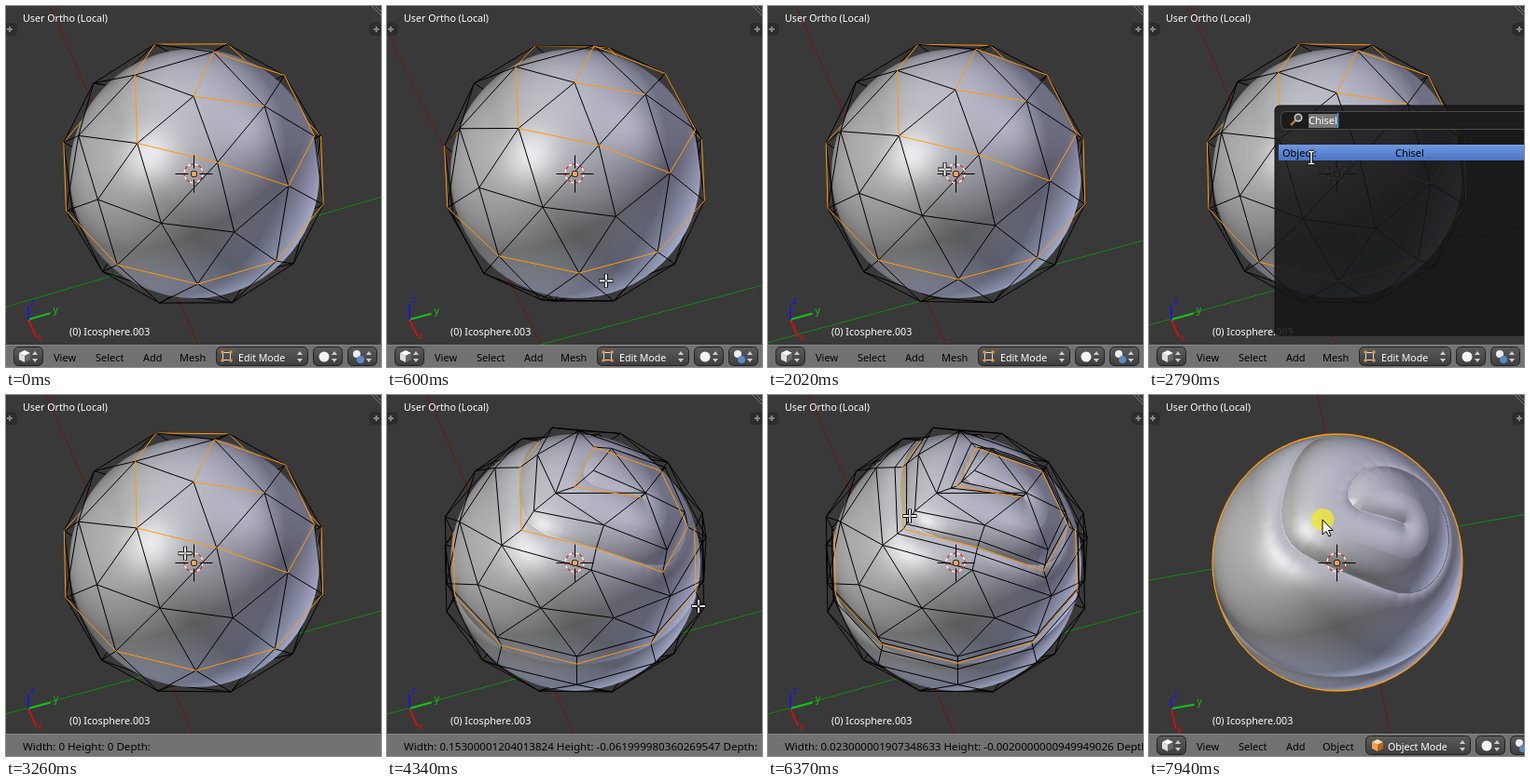
An HTML page with a canvas that plays this animation: 402x388 px, repeating every 8000 ms.

```html
<!DOCTYPE html>
<html>
<head>
<meta charset="utf-8">
<style>
html, body { margin: 0; width: 100%; height: 100%; overflow: hidden; background: #393939; }
canvas { display: block; }
</style>
</head>
<body>
<canvas id="stage" width="402" height="388"></canvas>
<script>
const ctx = document.getElementById('stage').getContext('2d');
const LOOP = 8000, FIRST = 130, STEP = 155.4;
const CX = 201, CY = 180, SCALE = 145, ORANGE = '#ff9a0a';
const CUT_WIDTH = .175, CUT_DEPTH = .062;

const clamp = (v, lo, hi) => Math.min(hi, Math.max(lo, v));
const ramp = (t, a, b) => clamp((t - a) / (b - a), 0, 1);
const mix = (p, q, k) => p.map((v, i) => v + (q[i] - v) * k);
const add = (p, q, k = 1) => p.map((v, i) => v + q[i] * k);
const scale = (p, k) => p.map(v => v * k);
const dot = (p, q) => p[0] * q[0] + p[1] * q[1] + p[2] * q[2];
const unit = p => scale(p, 1 / Math.hypot(...p));
const cross = (p, q) => [p[1] * q[2] - p[2] * q[1], p[2] * q[0] - p[0] * q[2], p[0] * q[1] - p[1] * q[0]];
const distance = (p, q) => Math.hypot(...add(p, q, -1));

// keys: [time, ...values]
function track(t, keys) {
  const i = Math.max(0, keys.findLastIndex(k => k[0] <= t));
  const a = keys[i], b = keys[i + 1] || a;
  return mix(a, b, a === b ? 0 : ramp(t, a[0], b[0])).slice(1);
}
// azimuth and elevation in degrees
const viewKeys = [[0, 19.7, 55.1], [1060, 20.2, 41.8], [2150, 19, 53.3], [6960, 19, 53.3], [7890, 11, 64.3]];
const pointerKeys = [[0, 232, 400], [1060, 237, 214], [2300, 174, 163], [3100, 174, 163], [4320, 334, 227],
  [4600, 334, 227], [4930, 128, 128], [5720, 128, 128], [6340, 152, 130], [6800, 152, 130], [7890, 186, 134]];

// Icosphere with one subdivision
const ring = (n, phase, z) => Array.from({ length: n }, (_, k) => {
  const a = (phase + 360 / n * k) * Math.PI / 180, r = Math.sqrt(1 - z * z);
  return [r * Math.cos(a), r * Math.sin(a), z];
});
const cap = [[0, 0, 1], ...ring(5, 0, .851), ...ring(5, 0, .447), ...ring(5, 36, .526)];
const verts = [...cap, ...ring(10, 18, 0), ...cap.map(v => scale(v, -1))];
const edges = verts.flatMap((p, i) => verts.flatMap((q, j) => i < j && distance(p, q) < .7 ? [[i, j]] : []));

const spiral = [19, 8, 13, 4, 5, 1, 11, 7, 12, 3, 0, 2];
const equator = Array.from({ length: 11 }, (_, i) => 16 + i % 10);
const marked = new Set();
const sideways = {};
for (const path of [spiral, equator]) path.forEach((v, i) => {
  if (i) marked.add([path[i - 1], v].sort((a, b) => a - b).join());
  const closed = path === equator;
  const prev = path[i - 1] ?? (closed && path[9]), next = path[i + 1] ?? (closed && path[1]);
  sideways[v] = prev && next !== false
    ? unit(cross(verts[v], add(verts[next], verts[prev], -1))) : [0, 0, 0];
});

function makeView([azimuth, elevation]) {
  const a = azimuth * Math.PI / 180, e = elevation * Math.PI / 180;
  const right = [Math.sin(a), Math.cos(a), 0];
  const down = [Math.cos(a) * Math.sin(e), -Math.sin(a) * Math.sin(e), -Math.cos(e)];
  const near = [Math.cos(a) * Math.cos(e), -Math.sin(a) * Math.cos(e), Math.sin(e)];
  const eye = v => [dot(v, right), dot(v, down), dot(v, near)];
  return { eye, at: (v, k = SCALE, x = CX, y = CY) => [x + k * dot(v, right), y + k * dot(v, down)] };
}

function line(p, q, color, width = 1) {
  ctx.strokeStyle = color;
  ctx.lineWidth = width;
  ctx.beginPath();
  ctx.moveTo(...p);
  ctx.lineTo(...q);
  ctx.stroke();
}
function text(str, x, y, color = '#000', size = 11) {
  ctx.font = size + 'px "Noto Sans", "Open Sans", sans-serif';
  ctx.fillStyle = color;
  ctx.fillText(str, x, y);
}
function disc(x, y, r, color) {
  ctx.fillStyle = color;
  ctx.beginPath();
  ctx.arc(x, y, r, 0, 7);
  ctx.fill();
}
function box(x, y, w, h, r, fill, border) {
  ctx.beginPath();
  ctx.roundRect(x, y, w, h, r);
  ctx.fillStyle = fill;
  ctx.fill();
  if (border) { ctx.strokeStyle = border; ctx.lineWidth = 1; ctx.stroke(); }
}
function poly(points, fill) {
  ctx.fillStyle = fill;
  ctx.beginPath();
  points.forEach(p => ctx.lineTo(...p));
  ctx.closePath();
  ctx.fill();
}
function vertical(y, h, top, bottom) {
  const g = ctx.createLinearGradient(0, y, 0, y + h);
  g.addColorStop(0, top);
  g.addColorStop(1, bottom);
  return g;
}
const cross4 = [[1, 0], [-1, 0], [0, 1], [0, -1]];
function drawCross(x, y, from, to, color, width) {
  for (const [dx, dy] of cross4)
    line([x + dx * from, y + dy * from], [x + dx * to, y + dy * to], color, width);
}

function drawAxes(view) {
  const origin = scale([-311, 75, -621], 1 / SCALE);
  const axis = (dir, color) => line(view.at(add(origin, dir, -9)), view.at(add(origin, dir, 9)), color);
  axis([1, 0, 0], '#7a1010');
  axis([0, 1, 0], '#128a12');
}

// Rounded path on the unit sphere
function roundedPath(path) {
  const p = path.map(v => verts[v]), out = [p[0]];
  for (let i = 1; i < p.length - 1; i++) {
    const a = i > 1 ? mix(p[i - 1], p[i], .5) : p[0], b = mix(p[i], p[i + 1], .5);
    for (let k = 1; k <= 5; k++) out.push(unit(mix(mix(a, p[i], k / 5), mix(p[i], b, k / 5), k / 5)));
  }
  return [...out, p.at(-1)];
}
const grooves = [spiral.slice(2), [23, 24, 25, 16, 17, 18]].map(roundedPath);

// Directions in eye space (y down), diffuse colour and highlight strength
const lights = [
  { dir: unit([-.892, -.3, .9]), color: [.8, .8, .8], shine: .5 },
  { dir: unit([.588, -.46, .248]), color: [.498, .5, .6], shine: .2 },
  { dir: unit([.216, .392, -.216]), color: [.798, .838, 1], shine: 0 }
];
for (const l of lights) l.half = unit(add(l.dir, [0, 0, 1]));

function shade(n) {
  const rgb = [.04, .04, .04];
  for (const { dir, half, color, shine } of lights) {
    const diffuse = .8 * Math.max(0, dot(n, dir));
    const gloss = diffuse ? .5 * shine * Math.max(0, dot(n, half)) ** 35 : 0;
    for (let i = 0; i < 3; i++) rgb[i] += color[i] * diffuse + gloss;
  }
  return rgb;
}

const SIZE = 288, HALF = SIZE / 2;
const ball = Object.assign(document.createElement('canvas'), { width: SIZE, height: SIZE });

function sphereNormal(x, y, radius) {
  let nx = (x - HALF) / radius, ny = (y - HALF) / radius;
  const r = Math.hypot(nx, ny);
  if (r > .999) { nx *= .999 / r; ny *= .999 / r; }
  return [nx, ny, Math.sqrt(1 - nx * nx - ny * ny)];
}

function grooveHeights(view, depth, radius) {
  const segments = [];
  for (const groove of grooves) {
    const p = groove.map(view.eye);
    p.slice(1).forEach((b, i) => {
      const d = add(b, p[i], -1);
      if (b[2] > -.4) segments.push([...p[i], ...d, dot(d, d)]);
    });
  }
  return Float32Array.from({ length: SIZE * SIZE }, (_, i) => {
    const [x, y, z] = sphereNormal(i % SIZE, Math.floor(i / SIZE), radius);
    let best = 9;
    for (const [ax, ay, az, dx, dy, dz, len] of segments) {
      const px = x - ax, py = y - ay, pz = z - az;
      let k = (px * dx + py * dy + pz * dz) / len;
      k = k < 0 ? 0 : k > 1 ? 1 : k;
      const ex = px - k * dx, ey = py - k * dy, ez = pz - k * dz;
      best = Math.min(best, ex * ex + ey * ey + ez * ez);
    }
    return -depth * Math.exp(-Math.sqrt(best) / .11);
  });
}

function paintBall(view, depth, radius) {
  const brush = ball.getContext('2d'), image = brush.createImageData(SIZE, SIZE);
  const h = depth ? grooveHeights(view, depth, radius) : new Float32Array(SIZE * SIZE);
  for (let y = 1; y < SIZE - 1; y++) for (let x = 1; x < SIZE - 1; x++) {
    const i = y * SIZE + x;
    let n = sphereNormal(x, y, radius);
    if (depth) {
      const slope = [(h[i + 1] - h[i - 1]) * radius / 2, (h[i + SIZE] - h[i - SIZE]) * radius / 2, 0];
      n = unit(add(n, add(slope, n, -dot(slope, n)), -1));
    }
    const rgb = shade(n);
    for (let c = 0; c < 3; c++) image.data[i * 4 + c] = 255 * rgb[c];
    image.data[i * 4 + 3] = 255;
  }
  brush.putImageData(image, 0, 0);
}

function drawBody(view, cut, bevel, smooth) {
  const radius = 134 + 2 * cut;
  paintBall(view, smooth ? .07 : .03 * cut + .025 * bevel, radius);
  ctx.save();
  ctx.beginPath();
  ctx.ellipse(CX + 1, CY, radius - 2 * cut, radius + 2 * cut, 0, 0, 7);
  ctx.save();
  ctx.clip();
  ctx.drawImage(ball, CX + 1 - HALF, CY - HALF);
  ctx.restore();
  if (smooth) { ctx.strokeStyle = ORANGE; ctx.lineWidth = 1.3; ctx.stroke(); }
  ctx.restore();
}

function buildWire(view, cut, bevel) {
  const wire = { front: [], back: [] };
  const points = verts.map((v, i) => {
    const side = sideways[i];
    if (!side) return { v, outer: v, inner: v, mid: v, depth: view.eye(v)[2] };
    const outer = add(v, side, -CUT_WIDTH * cut), inner = add(v, side, CUT_WIDTH * cut);
    const mid = add(scale(v, 1 - CUT_DEPTH * cut), side, .01 * bevel);
    return { v, outer, inner, mid, depth: view.eye(v)[2] };
  });
  const put = (list, a, b, color = '#000') => list.push([view.at(a), view.at(b), color]);
  const facing = (p, q) => distance(p.outer, q.v) < distance(p.inner, q.v) ? p.outer : p.inner;
  for (const [i, j] of edges) {
    const a = points[i], b = points[j];
    const list = a.depth + b.depth > -.1 ? wire.front : wire.back;
    if (!marked.has(i + ',' + j)) {
      put(list, facing(a, b), facing(b, a));
      continue;
    }
    if (cut) for (const side of ['outer', 'inner']) {
      put(list, a[side], b[side]);
      if (bevel) put(list, mix(a.mid, a[side], .28 * bevel), mix(b.mid, b[side], .28 * bevel));
    }
    put(list, a.mid, b.mid, ORANGE);
  }
  if (cut) points.forEach(({ outer, mid, inner, depth }, i) => {
    const list = depth > -.1 ? wire.front : wire.back;
    if (sideways[i]) { put(list, outer, mid); put(list, mid, inner); }
  });
  return wire;
}
// Orange lines go on top of black ones
function drawWire(list) {
  for (const color of ['#000', ORANGE])
    for (const [p, q, c] of list) if (c === color) line(p, q, c);
}

function drawCenter() {
  ctx.lineWidth = 1.2;
  ctx.setLineDash([4, 4]);
  for (const [color, shift] of [['#fff', 0], ['#e02020', 4]]) {
    ctx.strokeStyle = color;
    ctx.lineDashOffset = shift;
    ctx.beginPath();
    ctx.arc(CX, CY, 10, 0, 7);
    ctx.stroke();
  }
  ctx.setLineDash([]);
  drawCross(CX + .5, CY + .5, 6, 20, '#000');
  box(CX - 2.5, CY - 2.5, 6, 6, 2, '#f0a860', '#201000');
}

function drawOverlay(view) {
  text('User Ortho (Local)', 18, 17, '#fff', 10.7);
  text('(0) Icosphere.003', 68, 354, '#fff', 10.7);
  for (const x of [4, 397]) {
    box(x - 8, 18, 16, 14, 5, '#2d2d2d');
    drawCross(x, 25, 0, 3, '#858585', 2);
  }
  for (const x of [392, 396]) line([x, 0], [402, 402 - x], '#777');
  const axis = (name, dir, color, dx, dy) => {
    const [x, y] = view.at(dir, 25, 24, 337);
    line([24, 337], [x, y], color, 2);
    text(name, x + dx, y + dy, color, 10.5);
  };
  axis('x', [1, 0, 0], '#d01010', 1, 4);
  axis('y', [0, 1, 0], '#18c018', 3, 0);
  axis('z', [0, 0, 1], '#1818e0', 2, -1);
}

function button(x, w) {
  box(x + .5, 366.5, w, 20, 5, vertical(366, 21, '#5c5c5c', '#3d3d3d'), '#222');
  const a = x + w - 8;
  for (const s of [-1, 1])
    poly([[a - 3, 377 + 2 * s], [a + 3, 377 + 2 * s], [a, 377 + 6 * s]], '#ccc');
}

function cube(x, y, top, left, right) {
  poly([[x, y - 6], [x + 6, y - 3], [x, y], [x - 6, y - 3]], top);
  for (const [side, color] of [[-6, left], [6, right]])
    poly([[x + side, y - 3], [x, y], [x, y + 7], [x + side, y + 4]], color);
}

function drawHeader(status, objectMode) {
  ctx.fillStyle = '#727272';
  ctx.fillRect(0, 364, 402, 24);
  line([0, 364.5], [402, 364.5], '#858585');
  if (status) return text(status, 18, 382, '#000', 11.6);
  button(8, 31);
  cube(20, 376, '#fff', '#ddd', '#666');
  text('View', 51, 382);
  text('Select', 96, 382);
  text('Add', 147, 382);
  text(objectMode ? 'Object' : 'Mesh', 186, 382);
  const x = objectMode ? 232 : 225, width = objectMode ? 112 : 98;
  button(x, width);
  if (objectMode) {
    cube(x + 13, 376, '#ffd8a8', '#f0a050', '#b86818');
  } else {
    ctx.strokeStyle = '#ddd';
    ctx.strokeRect(x + 7.5, 372.5, 8, 8);
    for (const dx of [7, 16]) for (const y of [372, 381]) disc(x + dx, y, 1.8, '#f09030');
  }
  text(objectMode ? 'Object Mode' : 'Edit Mode', x + 24, 382, '#fff', 10.6);
  const next = x + width + 6;
  button(next, 31);
  disc(next + 12, 377, 5.5, '#f4f4f4');
  button(next + 37, 31);
  disc(next + 47, 374, 4, '#eee');
  disc(next + 51, 380, 4, '#5a8ac8');
}

function drawSearch(x, y) {
  box(x, y, 300, 247, 5, 'rgba(22,22,22,.88)', '#111');
  box(x + 6.5, y + 6.5, 320, 19, 5, '#1c1c1c', '#4a4a4a');
  line([x + 17, y + 21], [x + 22, y + 16], '#b07040', 2.5);
  disc(x + 25, y + 13, 4.5, '#ccc');
  disc(x + 25, y + 13, 3, '#555');
  ctx.fillStyle = '#777';
  ctx.fillRect(x + 36, y + 9, 31, 15);
  text('Chisel', x + 36, y + 20, '#fff');
  line([x + 67.5, y + 8], [x + 67.5, y + 24], '#4a90e0', 1.5);
  ctx.fillStyle = vertical(y + 42, 17, '#7099e2', '#4a74c2');
  ctx.fillRect(x + 4, y + 42, 300, 17);
  text('Object:', x + 8, y + 55);
  text('Chisel', x + 129, y + 55);
}

function drawPointer([x, y], kind, click) {
  if (click) disc(x, y, kind === 'arrow' ? 12 : 10, 'rgba(240,232,50,.8)');
  if (kind === 'arrow') {
    poly([[0, 0], [0, 16], [4, 12.5], [7, 18], [9, 17], [6.5, 11.5], [11, 11.5]].map(p => add(p, [x, y])), '#fff');
    ctx.strokeStyle = '#000';
    ctx.lineWidth = 1;
    ctx.stroke();
  } else if (kind === 'beam') {
    for (const [color, w] of [['#000', 3.5], ['#fff', 1.5]]) {
      line([x, y - 6], [x, y + 6], color, w);
      for (const end of [y - 6.5, y + 6.5]) line([x - 3, end], [x + 3, end], color, w);
    }
  } else {
    drawCross(x, y, 1.5, 7.5, '#000', 4);
    drawCross(x, y, 1.5, 7, '#fff', 2);
  }
}

function statusText(k, width, height) {
  const show = full => k === 1 ? full : full * k;
  return `Width: ${show(width)} Height: ${show(height)} Depth:`;
}

function draw(t) {
  const view = makeView(track(t, viewKeys));
  const cut = ramp(t, 3260, 4320), bevel = ramp(t, 5700, 6340);
  const during = (a, b) => t >= a && t < b;
  const objectMode = t >= 6950;
  const first = during(2300, 3100), second = during(4930, 5700);
  let status = '';
  if (during(3100, 4600)) status = statusText(cut, '0.15300001204013824', '-0.061999980360269547');
  if (during(5700, 6800)) status = statusText(bevel, '0.023000001907348633', '-0.0020000000949949026');

  ctx.fillStyle = '#393939';
  ctx.fillRect(0, 0, 402, 388);
  drawAxes(view);
  const wire = buildWire(view, cut, bevel);
  if (!objectMode) drawWire(wire.back);
  drawBody(view, cut, bevel, objectMode);
  if (!objectMode) drawWire(wire.front);
  drawCenter();
  drawOverlay(view);
  drawHeader(status, objectMode);
  if (first) drawSearch(135, 107);
  if (second) drawSearch(93, 77);
  const kind = first || second ? 'beam' : objectMode ? 'arrow' : 'cross';
  drawPointer(track(t, pointerKeys), kind, during(2900, 3100) || during(5550, 5700) || t > 7880);
}

const start = performance.now();
let shown = -1;
function tick() {
  const time = (performance.now() - start) % LOOP;
  const t = time < FIRST ? 0 : FIRST + STEP * Math.floor((time - FIRST) / STEP);
  if (t !== shown) draw(shown = t);
  requestAnimationFrame(tick);
}
tick();
</script>
</body>
</html>
```
